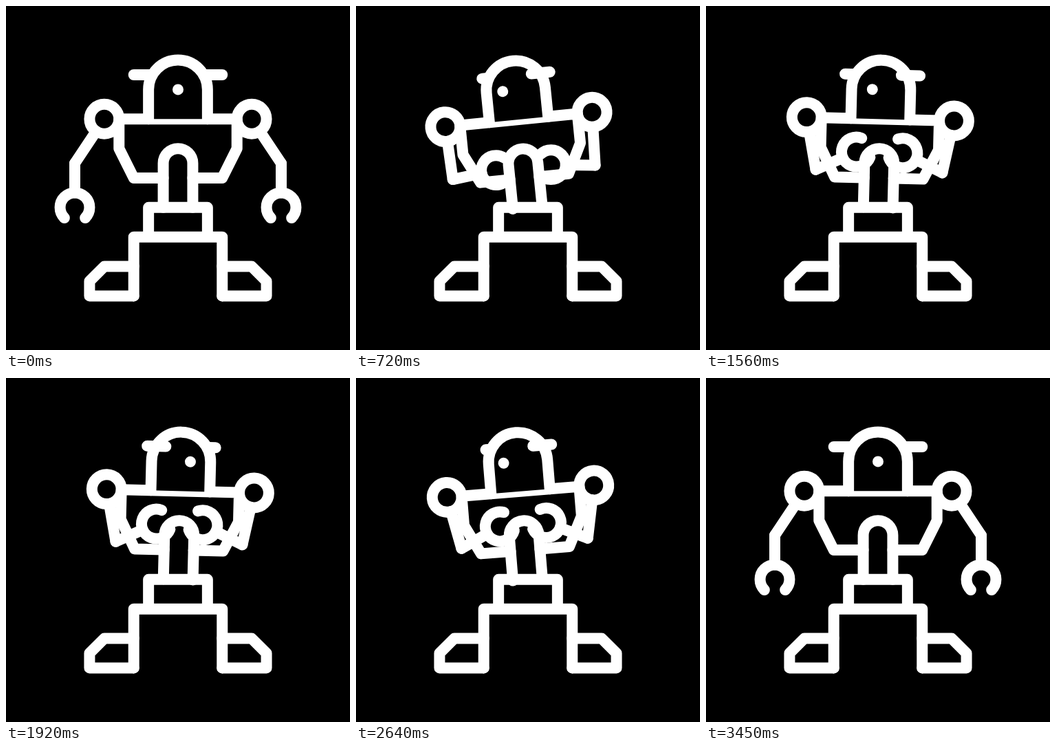
An HTML page for the animation above (3600 ms loop, 500x500 px).

```html
<!DOCTYPE html>
<html lang="en">
<head>
<meta charset="utf-8">
<title>Dancing robot</title>
<style>
  html, body { margin: 0; width: 100%; height: 100%; overflow: hidden; background: #000; }
  svg { display: block; width: 100vw; height: 100vh; }
</style>
</head>
<body>
<svg viewBox="-35 -35 70 70">
  <g fill="none" stroke="#fff" stroke-width="2.24" stroke-linecap="round" stroke-linejoin="round">
    <path d="M-6 6H6V12H-6ZM-9 24V12H9V24"/>
    <path d="M-9 18H-15L-18 21V24H-9M9 18H15L18 21V24H9"/>
    <g id="body">
      <path d="M-3 6V-3A3 3 0 0 1 3 -3V6"/>
      <path d="M-3 0H-9L-12 -6V-12H12V-6L9 0H3"/>
      <g id="head">
        <path id="dome" fill="#000" d="M-6 -12V-18A6 6 0 0 1 6 -18V-12"/>
        <path id="earL" d="M-9 -21H-5.2"/>
        <path id="earR" d="M9 -21H5.2"/>
        <circle id="eye" cy="-18" r="1.12" fill="#fff" stroke="none"/>
      </g>
      <g id="arms"></g>
    </g>
  </g>
</svg>
<script>
const $ = id => document.getElementById(id);
const LOOP = 3600, STEP = 30, LAST = 3450;

const arm = `
  <circle cx="-15" cy="-12" r="3"/>
  <g class="upper">
    <path d="M-16.66 -9.5L-21 -3"/>
    <g class="fore">
      <path d="M-21 -3V3"/>
      <path d="M-23.12 8.12A3 3 0 1 1 -18.88 8.12"/>
    </g>
  </g>`;
$('arms').innerHTML = `<g>${arm}</g><g transform="scale(-1 1)">${arm}</g>`;
const uppers = document.querySelectorAll('.upper');
const fores = document.querySelectorAll('.fore');

// [time, value] pairs, eased between neighbours
const tilt = [[320, 0], [905, -7], [1390, 7.5], [1728, -4.5], [2113, 7.4], [2500, -4.8], [3400, 0]];
const lift = [[0, 0], [1000, 1], [2780, 1], [3373, 0]];
const look = [[0, 0], [1000, -3.1], [1390, -3.1], [1850, 1.9], [1940, 1.9], [2310, -3.1], [2500, -3.1], [3230, 0]];

const ease = u => u * u * u * (u * (6 * u - 15) + 10);

function at(keys, t) {
  if (t <= keys[0][0]) return keys[0][1];
  for (let i = 1; i < keys.length; i++) {
    const [t0, a] = keys[i - 1], [t1, b] = keys[i];
    if (t < t1) return a + (b - a) * ease((t - t0) / (t1 - t0));
  }
  return keys[keys.length - 1][1];
}

const set = (el, value) => el.setAttribute('transform', value);
let side = 0;

function draw(t) {
  set($('body'), `rotate(${at(tilt, t)} 0 7)`);

  const p = at(lift, t);
  uppers.forEach(el => set(el, `rotate(${-45 * p ** 1.5} -15 -12)`));
  fores.forEach(el => set(el, `rotate(${-70 * p} -21 -3)`));

  const e = at(look, t);
  $('eye').setAttribute('cx', e);
  set($('earL'), `translate(${e < 0 ? -0.9 * e : 1.07 * e} 0)`);
  set($('earR'), `translate(${e < 0 ? 0.65 * e : -1.07 * e} 0)`);

  // the far ear goes behind the dome
  const now = e > 0 ? 1 : -1;
  if (now !== side) {
    side = now;
    const [far, near] = side < 0 ? ['earL', 'earR'] : ['earR', 'earL'];
    $('head').append($(far), $('dome'), $(near), $('eye'));
  }
}

const start = performance.now();
function tick() {
  const t = (performance.now() - start) % LOOP;
  draw(Math.min(LAST, Math.floor(t / STEP) * STEP));
  requestAnimationFrame(tick);
}
tick();
</script>
</body>
</html>
```
